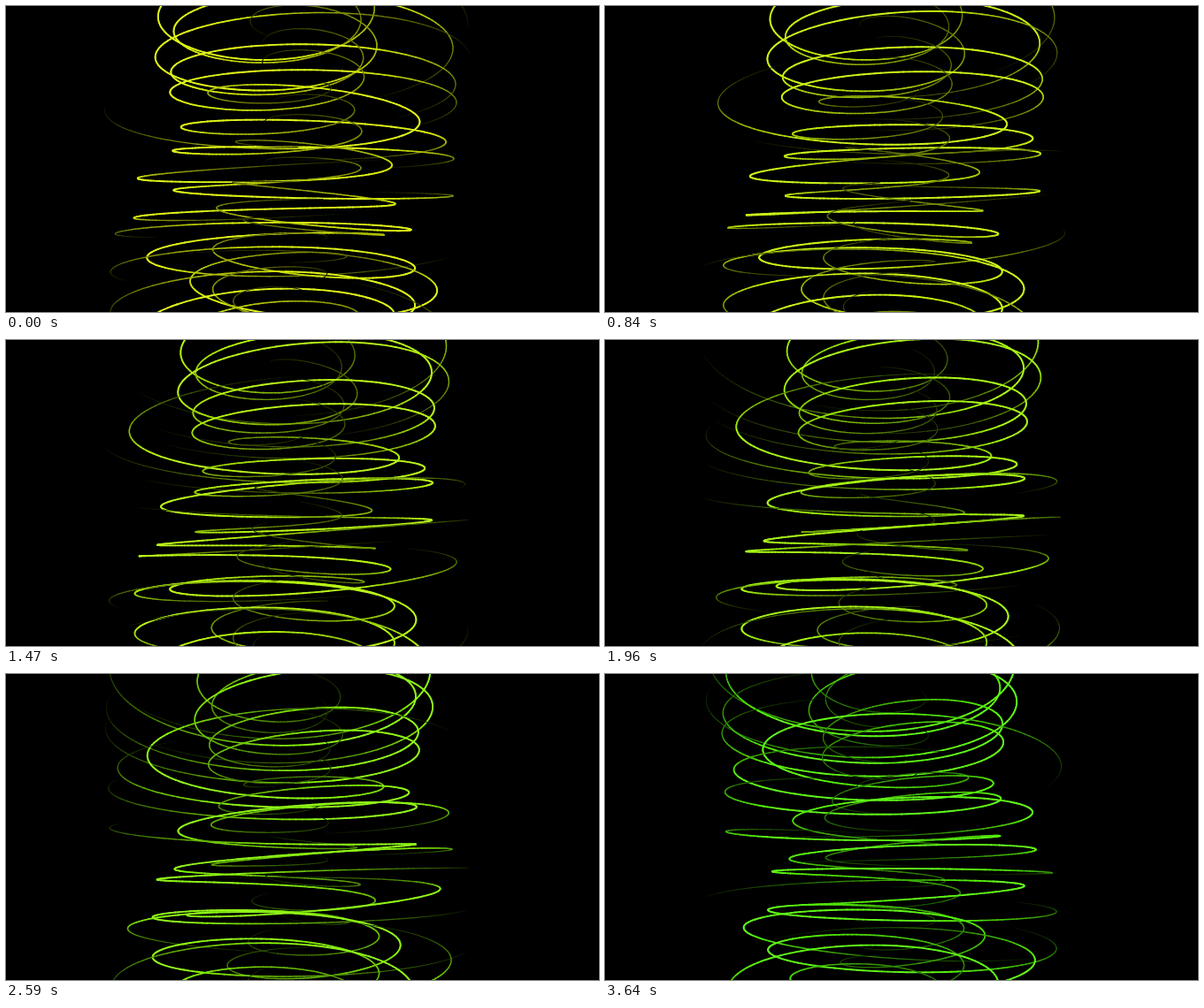
Write an HTML page with a canvas that moves like this. It is 670 px wide and 346 px high and loops after 3710 ms.

```html
<!DOCTYPE html>
<html lang="en">
<head>
<meta charset="utf-8">
<title>Spiral column</title>
<style>
html, body { margin: 0; width: 100%; height: 100%; overflow: hidden; background: #000; }
canvas { display: block; }
</style>
</head>
<body>
<canvas id="stage" width="670" height="346"></canvas>
<script>
const ctx = document.getElementById('stage').getContext('2d');
const LOOP = 3710, STEP = 70;
const CX = 323.5, HORIZON = 215, DEPTH = 0.0021;
const SPIN = 0.953, DECAY = 0.0183, OFFSET = 778;
const R_MIN = 28, R_MAX = 209, SEGMENTS = 240;
const RAD = Math.PI / 180;

// Radius of each spiral at its left side when the loop starts, top to bottom
const starts = [147, 130, 150, 133, 134, 204, 122, 131, 169, 130, 173, 193, 159, 198, 112, 198, 172, 128];
const levelOf = i => 1 + 21.7 * i;

// Lines fade in at the rim and fade out towards the axis
const glow = r => Math.max(0, Math.min(1, (r - R_MIN) / 102, (R_MAX - r) / 42));

// A ripple that runs through every spiral
const ripple = (r, t) => 21 * Math.sin((118 - 1.5 * (r - 150) - 54 * t) * RAD);

function project(r, angle, level, t) {
  const x = -r * Math.cos(angle), z = -r * Math.sin(angle);
  const y = level - HORIZON + ripple(r, t);
  return [CX + x - x * x / 6000, HORIZON + y * (1 + DEPTH * z)];
}

function drawSpiral(level, start, t, hue) {
  const age = r => Math.log((start + OFFSET) / (r + OFFSET)) / DECAY;
  const from = age(R_MAX), to = age(R_MIN);
  let last = null;
  for (let i = 0; i <= SEGMENTS; i++) {
    const s = from + (to - from) * i / SEGMENTS;
    const r = (start + OFFSET) * Math.exp(-DECAY * s) - OFFSET;
    const p = project(r, SPIN * (s - t), level, t);
    const g = glow(r);
    if (last && g > 0.05) {
      ctx.strokeStyle = `hsl(${hue} 92% ${53 * g}%)`;
      ctx.lineWidth = 0.7 + 1.2 * g;
      ctx.beginPath();
      ctx.moveTo(...last);
      ctx.lineTo(...p);
      ctx.stroke();
    }
    last = p;
  }
}

function draw(now) {
  const t = Math.floor(now % LOOP / STEP) * STEP / 1000;
  const hue = 66 + 5.5 * t + 1.1 * t * t;
  ctx.fillStyle = '#000';
  ctx.fillRect(0, 0, 670, 346);
  ctx.lineCap = 'round';
  starts.forEach((start, i) => drawSpiral(levelOf(i), start, t, hue));
}

let begin = null;
function tick(now) {
  if (begin === null) begin = now;
  draw(now - begin);
  requestAnimationFrame(tick);
}
draw(0);
requestAnimationFrame(tick);
</script>
</body>
</html>
```
